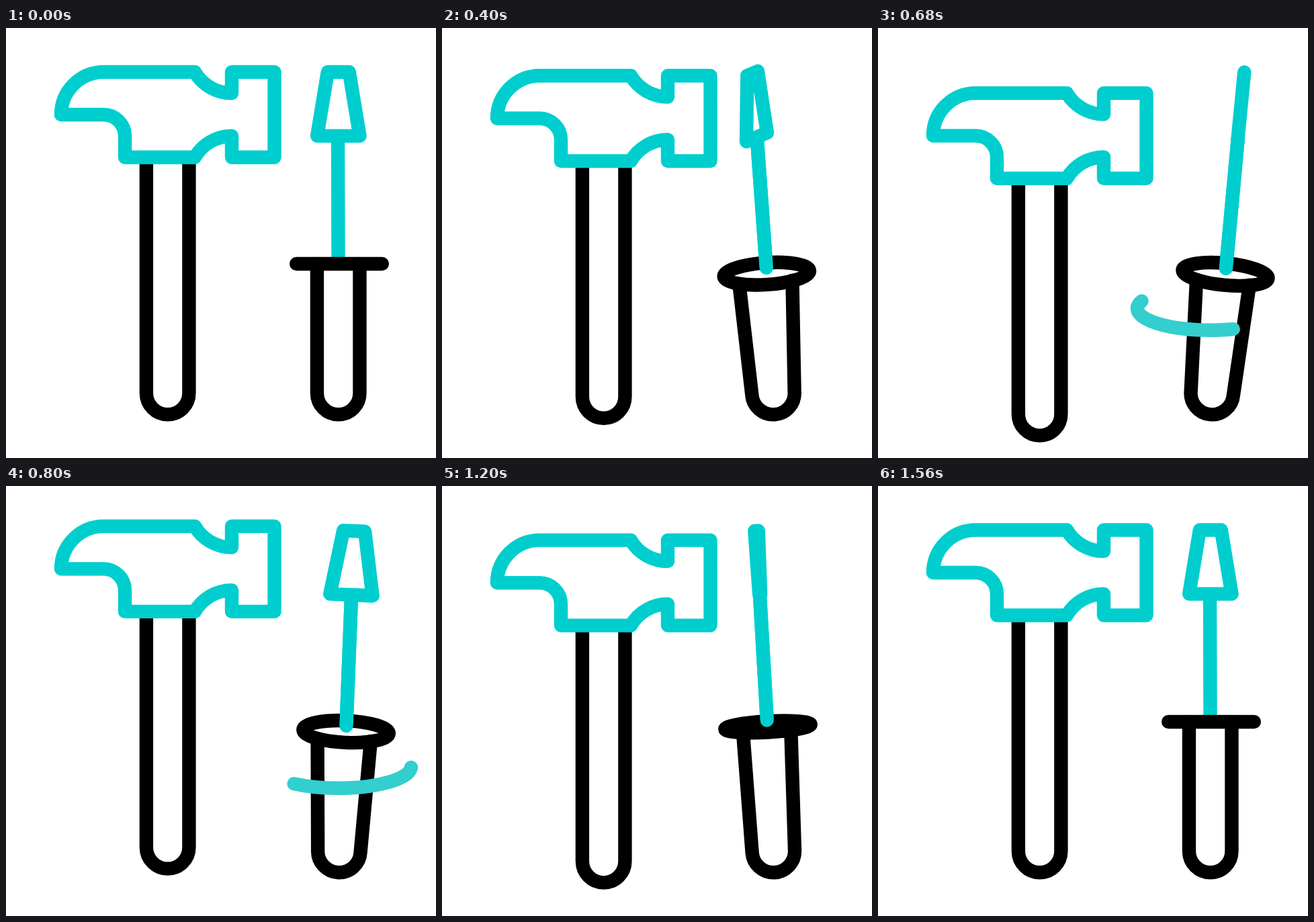
An HTML page that plays this animation: 640x640 px, repeating every 2080 ms.

```html
<!DOCTYPE html>
<html lang="en">
<head>
<meta charset="utf-8">
<title>Hammer and screwdriver</title>
<style>
  html, body { margin: 0; width: 100%; height: 100%; overflow: hidden; background: #fff; }
  svg { display: block; width: 100%; height: 100%; }
  path, ellipse { fill: none; stroke-width: 20.4; stroke-linecap: round; stroke-linejoin: round; }
  .dark { stroke: #000; }
  .teal { stroke: #00cece; }
  .swirl { stroke: #33cece; }
</style>
</head>
<body>
<svg viewBox="0 0 640 640">
  <g id="hammer">
    <path class="dark" d="M208.9 196V543.5a31.75 31.75 0 0 0 63.5 0V196"/>
    <path class="teal" d="M82 129A63.5 63.5 0 0 1 145.3 65.5H281A63.5 63.5 0 0 0 336 97V65.5H399.5V192.5H336V160.7A63.5 63.5 0 0 0 281 192.5H177V160.7A31.75 31.75 0 0 0 145.3 129Z"/>
  </g>
  <g id="driver">
    <path id="shaftBack" class="teal"/>
    <path id="grip" class="dark"/>
    <ellipse id="collar" class="dark" rx="63.8"/>
    <path id="shaftFront" class="teal"/>
    <path id="tip" class="teal"/>
  </g>
  <path id="swirl" class="swirl"/>
</svg>
<script>
const LOOP = 2080, STEP = 40;
const $ = id => document.getElementById(id);
const hammer = $('hammer'), driver = $('driver'), grip = $('grip'), collar = $('collar');
const shaftBack = $('shaftBack'), shaftFront = $('shaftFront'), tip = $('tip'), swirl = $('swirl');

const mix = (a, b, u) => a + (b - a) * u;
const clamp = u => Math.min(1, Math.max(0, u));
const ramp = (t, from, to) => clamp((t - from) / (to - from));
const ease = (t, from, to) => { const u = ramp(t, from, to); return u * u * (3 - 2 * u); };

// Eased value along [time, value] keys
function track(keys, t) {
  let v = keys[0][1];
  for (let i = 1; i < keys.length; i++)
    if (t > keys[i - 1][0]) v = mix(keys[i - 1][1], keys[i][1], ease(t, keys[i - 1][0], keys[i][0]));
  return v;
}

const DROP = [[320, 0], [640, 35.1], [920, -32], [1200, 15.1], [1560, 0]];
const LEAN = [[0, 0], [320, -5.2], [680, 5.6], [1040, -6.2], [1360, 0]];

// Ellipse around the grip, from back left past the front to back right
const rad = Math.PI / 180, EX = 494.5, EY = 417.5, RX = 108.5, RY = 32.3;
const px = EX - RX * Math.cos(26 * rad), qx = EX + RX * Math.cos(26 * rad), py = EY - RY * Math.sin(26 * rad);
swirl.setAttribute('d', `M${px} ${py}A${RX} ${RY} 0 1 0 ${qx} ${py}`);
const swirlLength = swirl.getTotalLength();

function drawTip(t, open) {
  const narrow = ease(t, 800, 1040);
  let top = 16 - 5.5 * narrow, bottom = 31.7 - 2 * narrow, skew = 0;
  if (t < 1040) {
    const turns = t < 800 ? ramp(t, 320, 800) : 1 + Math.sin(ramp(t, 800, 1040) * Math.PI / 2) / 2;
    const a = turns * 2 * Math.PI;
    skew = 0.2 * Math.sin(a);
    const topDip = top * skew, bottomDip = bottom * skew;
    top *= Math.cos(a);
    bottom *= Math.cos(a);
    setTip(top, bottom, topDip, bottomDip, open);
  } else {
    const u = ease(t, 1040, 1360);
    setTip(mix(-10.5, 16, u), mix(-29.7, 31.7, u), 0, 0, open);
  }
}

function setTip(top, bottom, topDip, bottomDip, open) {
  const x = 494.8 + open, y1 = 65.5 + open, y2 = 160.6 + open;
  tip.setAttribute('d', `M${x - top} ${y1 + topDip}L${x + top} ${y1 - topDip}` +
    `L${x + bottom} ${y2 - bottomDip}L${x - bottom} ${y2 + bottomDip}Z`);
}

function draw(t) {
  hammer.setAttribute('transform', `translate(0 ${track(DROP, t)})`);

  const open = ease(t, 0, 320) - ease(t, 1040, 1360);
  driver.setAttribute('transform', `rotate(${track(LEAN, t)} 495 570)`);

  const half = 31.75 + 7.9 * open, rim = 351 + 27 * open, cx = 494.7;
  grip.setAttribute('d', `M${cx - half} ${rim}L${cx - 31.75} 543.5a31.75 31.75 0 0 0 63.5 0L${cx + half} ${rim}`);

  collar.setAttribute('cx', 496 + open);
  collar.setAttribute('cy', 351 + 14.3 * open);
  collar.setAttribute('ry', Math.max(0.01, 16.3 * open));

  const shaft = `M${494 + 2 * open} 163L${494.5 + 2.5 * open} ${340 + 16.5 * open}`;
  shaftBack.setAttribute('d', shaft);
  shaftFront.setAttribute('d', shaft);
  shaftFront.style.display = open > 0 ? '' : 'none';

  drawTip(t, open);

  const head = ease(t, 400, 880) * swirlLength, tail = ease(t, 640, 1120) * swirlLength;
  swirl.style.display = head - tail > 0.01 ? '' : 'none';
  swirl.setAttribute('stroke-dasharray', `${head - tail} ${2 * swirlLength}`);
  swirl.setAttribute('stroke-dashoffset', -tail);
}

function frame() {
  const t = performance.now() % LOOP;
  draw(Math.floor(t / STEP) * STEP);
  requestAnimationFrame(frame);
}
frame();
</script>
</body>
</html>
```
